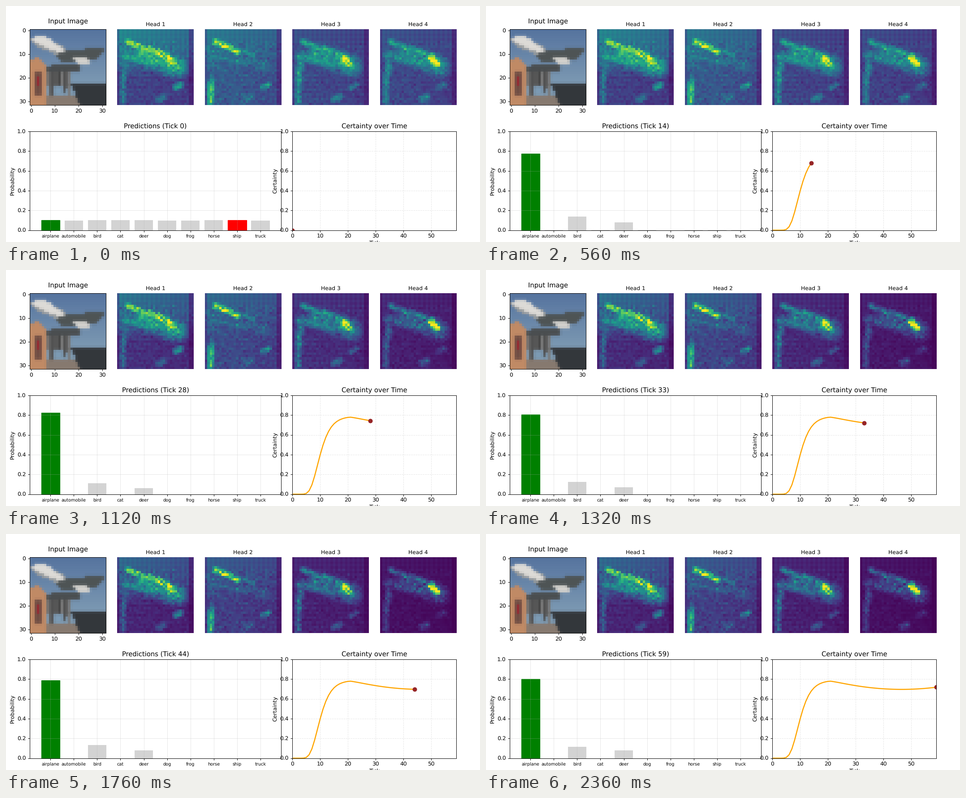
These frames come from a looping animation (1058 px wide and 529 px high, 2400 ms). A matplotlib script:

```python
import numpy as np
import matplotlib.pyplot as plt
from matplotlib.animation import FuncAnimation
from matplotlib.colors import to_rgb
from matplotlib.path import Path

W, H = 1058, 529
TICKS = 60
N = 32
CLASSES = ["airplane", "automobile", "bird", "cat", "deer",
           "dog", "frog", "horse", "ship", "truck"]

plt.rcParams.update({"font.family": "DejaVu Sans", "text.hinting": "none"})
fig = plt.figure(figsize=(12, 6), dpi=W / 12)
cols, rows = np.meshgrid(np.arange(N), np.arange(N))
tick = np.arange(TICKS)


def panel(x, y, w, h):
    """Axes placed in stage pixels, measured from the top left."""
    return fig.add_axes([x / W, 1 - (y + h) / H, w / W, h / H])


def soften(img, amount):
    """Mix every cell with its four neighbours."""
    p = np.pad(img, ((1, 1), (1, 1), (0, 0)), mode="edge")
    near = (p[:-2, 1:-1] + p[2:, 1:-1] + p[1:-1, :-2] + p[1:-1, 2:]) / 4
    return img * (1 - amount) + near * amount


def scene(seed=5):
    """Plane, building and trees as flat shapes on a coarse grid."""
    rng = np.random.default_rng(seed)
    down = np.clip(rows / 23, 0, 1)[..., None]
    img = np.array(to_rgb("#56749f")) * (1 - down) + np.array(to_rgb("#7d9ab3")) * down
    centres = np.column_stack([cols.ravel(), rows.ravel()]) + 0.5

    def shape(color, *pts):
        img[Path(pts).contains_points(centres).reshape(N, N)] = to_rgb(color)

    def box(color, x, y, w, h):
        img[y:y + h, x:x + w] = to_rgb(color)

    box("#86796f", 6, 28, 15, 4)
    for x in range(7, 17):
        shade = rng.uniform(0.24, 0.5)
        box((shade, shade, shade), x, 17, 1, rng.integers(7, 12))
    shape("#33373b", (17, 23), (21, 22.5), (32, 23), (32, 32), (21, 32))
    shape("#c08a65", (0, 13), (4, 12), (7, 16), (7, 32), (0, 32))
    box("#704e44", 2, 18, 3, 10)
    box("#9c2630", 3, 20, 1, 4)
    shape("#989b9c", (0, 4), (5, 3), (15, 8), (17, 11), (14, 12), (4, 8))
    shape("#dcdad6", (1, 4), (3, 3), (7, 3.4), (15, 9), (13, 10.6), (3, 6))
    shape("#4e5455", (11, 11), (16, 9), (31, 8), (31, 10), (27, 13), (13, 14))
    shape("#d2d0cc", (18, 12), (23, 12), (26, 14), (24, 15), (20, 15))
    shape("#4a4e50", (7, 16), (11, 15), (21, 15), (21, 18), (7, 18))
    return soften(img, 0.35)


def stroke(x0, y0, x1, y1, width):
    """Soft line between two cells."""
    dx, dy = x1 - x0, y1 - y0
    t = np.clip(((cols - x0) * dx + (rows - y0) * dy) / (dx * dx + dy * dy), 0, 1)
    d2 = (cols - x0 - t * dx) ** 2 + (rows - y0 - t * dy) ** 2
    return np.exp(-d2 / (2 * width ** 2))


FEATURES = [
    stroke(4, 5, 13, 9, 1.5),       # fuselage
    stroke(13, 8, 20, 11, 1.6),     # nose
    stroke(21, 12, 23, 14, 1.8),    # engine
    stroke(10, 10, 24, 15, 4.2),    # halo
    stroke(3, 11, 17, 14, 2.2),     # belly
    stroke(3, 14, 2, 22, 1.6),      # building, upper
    stroke(2, 22, 2, 30, 1.4),      # building, lower
    stroke(24, 24, 26, 23, 1.4),    # trees
    stroke(17, 29, 19, 28, 1.7),    # ground
]


def attention(seed, top, low, weights):
    """Heat field: woven backdrop, weighted features and grain."""
    rng = np.random.default_rng(seed)
    y = np.clip((rows - 8) / 12, 0, 1)
    field = (top * (1 - y) + low * y) * (1.1 - 0.3 * cols / N)
    field = field + 0.03 * (cols % 2) * (1 - y) + 0.02 * (rows % 2)
    for feature, weight in zip(FEATURES, weights):
        field = np.maximum(field, feature * weight)
    busy = np.clip((rows - 3) / 3, 0, 1)
    field = field * (1 + rng.normal(0, 0.13, (N, N)) * busy)
    field[:, 30:] *= 0.6
    field[:, 0] *= 0.75
    return np.clip(field / np.quantile(field, 0.998), 0, 1)


# field and how much it sharpens over the loop
HEADS = [
    (attention(1, .38, .18, [.78, .82, .92, .6, .55, .4, .4, .5, .35]), .4),
    (attention(2, .34, .26, [.82, .45, .3, .34, .4, .35, .72, .52, .38]), .35),
    (attention(3, .18, .18, [.5, .55, .86, .46, .46, .46, .42, .34, .38]), .6),
    (attention(4, .18, .17, [.46, .5, .9, .42, .42, .4, .38, .32, .38]), 1.1),
]

# certainty climbs, peaks near tick 20, then sags gently
level = np.minimum(0.79, 0.697 + 0.00014 * (tick - 46.5) ** 2)
certainty = level * np.exp(-0.68 * np.exp(-0.38 * (tick - 10)))


def probabilities():
    """The winner follows certainty; two rivals share what is left."""
    p = np.empty((len(CLASSES), TICKS))
    win = 0.1 + 0.15 * (1 - np.exp(-certainty / 0.05 - (tick / 20) ** 2)) + 0.77 * certainty
    fading = 7 / 9 * np.exp(-(tick / 10) ** 4)
    tilt = 0.5 + 0.2 * (1 - np.exp(-tick / 9)) - 0.0018 * tick
    p[0] = win
    p[2] = (1 - win) * (1 - fading) * tilt
    p[4] = (1 - win) * (1 - fading) * (1 - tilt)
    others = [1, 3, 5, 6, 7, 8, 9]
    share = np.array([.139, .151, .122, .112, .169, .17, .137])
    blend = np.clip(tick / 7, 0.1, 1)
    p[others] = (1 - win) * fading * (1 / 7 + np.outer(share - 1 / 7, blend))
    return p


probs = probabilities()

STEP, SIDE, LEFT = 195.45, 170.2, 53
TOP, LOW, TALL = 52.2, 281.2, 221.4

ax_img = panel(LEFT, TOP, SIDE, SIDE)
ax_img.imshow(scene(), aspect="auto", interpolation="nearest")
ax_img.set_title("Input Image", pad=10)

heat = []
for i, (field, _) in enumerate(HEADS, 1):
    ax = panel(LEFT + STEP * i, TOP, SIDE, SIDE)
    heat.append(ax.imshow(field, cmap="viridis", vmin=0, vmax=1,
                          aspect="auto", interpolation="nearest"))
    ax.set_title(f"Head {i}", fontsize=10)
    ax.axis("off")

ax_bar = panel(LEFT, LOW, 2 * STEP + SIDE, TALL)
bars = ax_bar.bar(CLASSES, probs[:, 0], color="lightgray")
ax_bar.set(ylim=(0, 1), ylabel="Probability")
ax_bar.tick_params(axis="x", labelsize=8)
ax_bar.grid(True, alpha=0.3)

ax_cert = panel(LEFT + 3 * STEP, LOW, STEP + SIDE, TALL)
curve, = ax_cert.plot([], [], lw=2)
dot, = ax_cert.plot([], [], "o", ms=7.1, color="#962426")
ax_cert.set(xlim=(0, TICKS - 1), ylim=(0, 1), ylabel="Certainty",
            title="Certainty over Time")
ax_cert.set_xlabel("Tick", labelpad=2.5)
ax_cert.grid(True, linestyle="--", alpha=0.3)


def update(k):
    s = np.clip((k - 8) / 38, 0, 1)
    s = s * s * (3 - 2 * s)
    for im, (field, gain) in zip(heat, HEADS):
        im.set_data(field ** (1 + gain * s))

    best = probs[:, k].argmax()
    for i, bar in enumerate(bars):
        bar.set_height(probs[i, k])
        bar.set_color("green" if i == 0 else "red" if i == best else "lightgray")
        if i not in (0, best):
            bar.set_edgecolor("none")
    ax_bar.set_title(f"Predictions (Tick {k})")

    curve.set_data(tick[:k + 1], certainty[:k + 1])
    curve.set_color("#f3e326" if k < 10 else "orange")
    dot.set_data([k], [certainty[k]])
    return [*heat, *bars, curve, dot]


anim = FuncAnimation(fig, update, frames=TICKS, interval=40,
                     init_func=lambda: update(0), repeat=True,
                     repeat_delay=0, blit=False)
plt.show()
```
